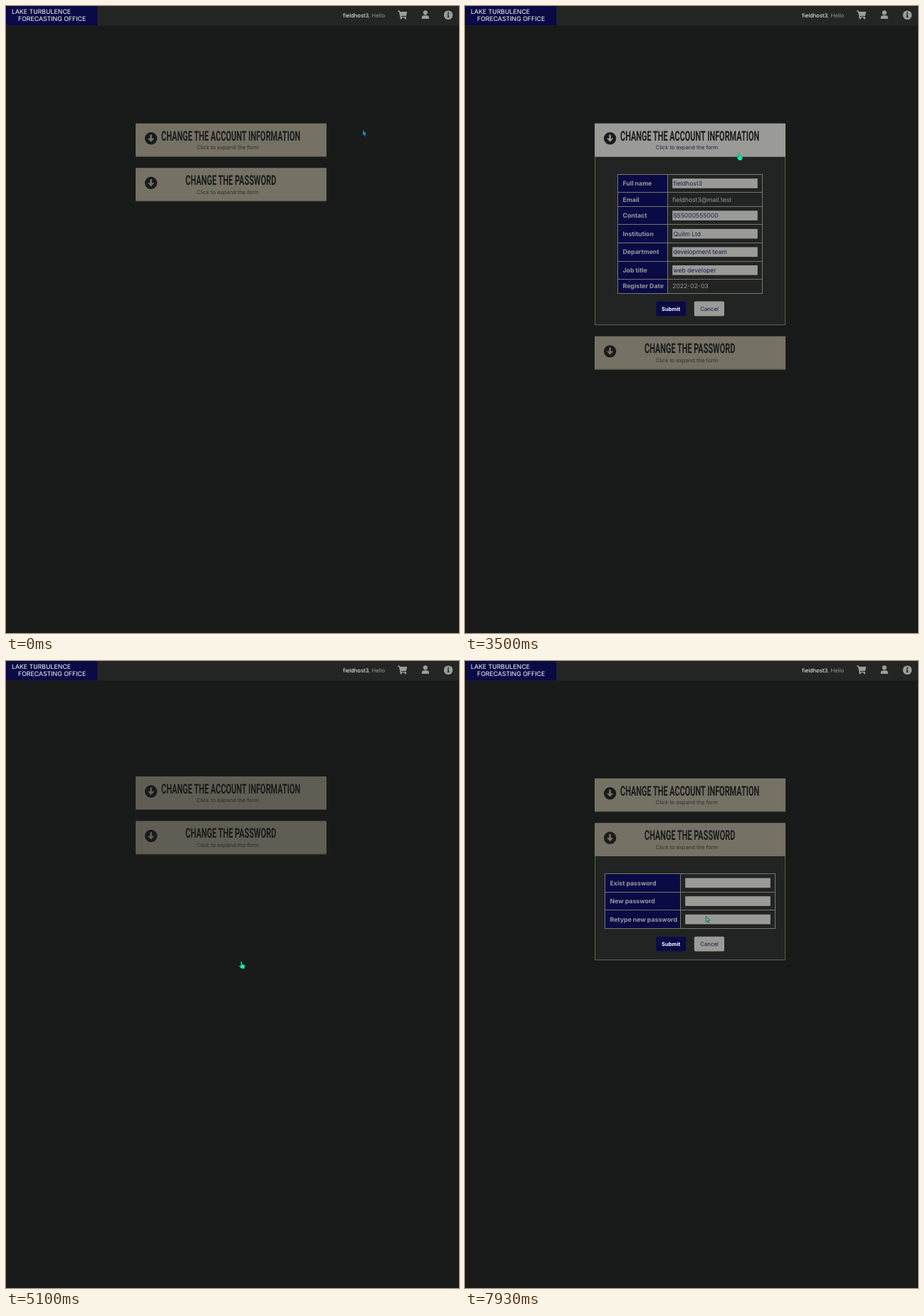
Animation, 636 px wide and 880 px high, one loop 8 s. Source, as an HTML page:

```html
<!DOCTYPE html>
<html lang="en">
<head>
<meta charset="utf-8">
<title>Account settings</title>
<style>
  html, body { margin: 0; width: 100%; height: 100%; overflow: hidden; background: #191b1a; }
  svg { display: block; width: 636px; height: 880px; font-family: Inter, Roboto, sans-serif; text-rendering: geometricPrecision; }
  .brand { font-size: 8.75px; fill: #fff; }
  .user { font-size: 7.7px; fill: #9a9a97; text-anchor: end; }
  .user tspan { fill: #fff; }
  .icon { fill: #9d9d9b; }
  .card { --face: #757165; --edge: #4d4b42; --note: #31312c; }
  .card.hover { --face: #9a9a96; --edge: #70706d; --note: #20224a; }
  .face, .cut { fill: var(--face); }
  .edge { fill: var(--edge); }
  .open .edge { display: none; }
  .dark { fill: #1a1c1b; }
  .title { font: 600 19px Roboto, sans-serif; fill: #1a1c1b; text-anchor: middle; }
  .note { font-size: 7.55px; fill: var(--note); text-anchor: middle; }
  .panel { fill: #222423; stroke: #5f5d55; shape-rendering: crispEdges; }
  .grid { fill: none; stroke: #77756b; shape-rendering: crispEdges; }
  .navy { fill: #0a0a45; }
  .label { font-size: 8.75px; font-weight: 700; fill: #9a9a9c; }
  .value { font-size: 8.6px; fill: #9a9a97; }
  .input { fill: #9a9a97; }
  .typed { fill: #1d1d50; }
  .button { font-size: 7.8px; text-anchor: middle; fill: #15154a; }
  .submit { font-size: 7.6px; font-weight: 700; fill: #fff; }
</style>
</head>
<body>
<svg viewBox="0 0 636 880">
  <rect width="636" height="880" fill="#191b1a"/>
  <rect width="636" height="27.7" fill="#242625"/>
  <rect class="navy" width="128.3" height="27.3"/>
  <text class="brand" x="8" y="10.7">LAKE TURBULENCE</text>
  <text class="brand" x="17" y="20.8">FORECASTING OFFICE</text>
  <text class="user" x="532" y="15.6"><tspan>fieldhost3</tspan>, Hello</text>
  <g class="icon">
    <path d="M550 6.5h2.8l.5 1.6h9.9l-1.3 6h-7.3l.2 1h6.6v1.2h-7.9l-1.7-8.4H550z"/>
    <circle cx="554.7" cy="17" r="1.4"/><circle cx="560.8" cy="17" r="1.4"/>
    <circle cx="588.8" cy="9.3" r="3.1"/>
    <path d="M583.7 18v-1.4q0-3.4 3.2-3.4h3.8q3.2 0 3.2 3.4V18z"/>
    <circle cx="621" cy="12.8" r="6.3"/>
    <path fill="#242625" d="M619.4 11.6h2.4v3.3h.8v1.2h-3.2v-1.2h.8v-2.1h-.8z"/>
    <circle cx="621" cy="9.7" r="1.1" fill="#242625"/>
  </g>
  <g id="page"></g>
  <circle id="click" r="7.7" fill="#d9ca35" opacity=".82"/>
  <g id="cursor">
    <path id="arrow" d="M0 0V8.2L1.8 6.6 3 9.4 4.3 8.8 3.2 6.1H5.6z" stroke="#17302c" stroke-width=".6"/>
    <path id="hand" fill="#08f0ac" stroke="#0b3a34" stroke-width=".3"
      d="M-.8 .2Q0 -1 .8 .2V3.6L3.8 4.2Q5 4.6 4.9 6L4.2 9.8H-.2L-2.9 6.4Q-2.8 5 -1.6 5.5L-.8 6.1z"/>
  </g>
</svg>
<script>
const LOOP = 8000, CARD_Y = 165;
const $ = id => document.getElementById(id);
const show = (el, on) => el.style.display = on ? '' : 'none';
const rect = (cls, x, y, w, h, r = 0) =>
  `<rect class="${cls}" x="${x}" y="${y}" width="${w}" height="${h}" rx="${r}"/>`;
const text = (cls, x, y, s) => `<text class="${cls}" x="${x}" y="${y}">${s}</text>`;

function row(x, y, split, right, [label, value, h, typed]) {
  const mid = y + h / 2, base = mid + 3.1;
  return rect('navy', x, y, split - x, h)
    + text('label', x + 7, base, label)
    + (typed ? rect('input', split + 6.7, mid - 6.8, right - split - 13.4, 13.6) : '')
    + text(typed ? 'value typed' : 'value', split + (typed ? 8 : 6.7), base, value)
    + `<path class="grid" d="M${x} ${y}H${right}"/>`;
}

function form(x, split, right, rows) {
  const top = 71.2;
  let y = top, body = '';
  for (const r of rows) {
    body += row(x, y, split, right, r);
    y += r[2];
  }
  const by = y + 11.6;
  return `<g class="form">`
    + `<rect class="panel" x="182.5" y="46.2" width="267" height="${y - 1.8}"/>` + body
    + `<path class="grid" d="M${split} ${top}V${y}"/>`
    + rect('grid', x, top, right - x, y - top)
    + rect('navy', 268.3, by, 41.8, 20.2, 2) + text('button submit', 289.2, by + 12.8, 'Submit')
    + rect('input', 321.8, by - .3, 42.2, 20.8, 2) + text('button', 343.1, by + 12.8, 'Cancel')
    + `</g>`;
}

function card(title, body) {
  return `<g class="card">${body}`
    + rect('face', 182, -.3, 268, 46.8, .8) + rect('edge', 182, 45.8, 268, 1)
    + `<circle class="dark" cx="203.6" cy="20.8" r="8.7"/>`
    + `<path class="cut" d="M202.3 15.6h2.6v5.2h3.4l-4.7 4.9-4.7-4.9h3.4z"/>`
    + `<text class="title" transform="translate(315.6 23.5) scale(.574 1)">${title}</text>`
    + text('note', 311.4, 36, 'Click to expand the form') + `</g>`;
}

const TALL = 25.55, LOW = 19.6;
$('page').innerHTML =
  card('CHANGE THE ACCOUNT INFORMATION', form(214.5, 284.5, 417.5, [
    ['Full name', 'fieldhost3', TALL, 1],
    ['Email', 'fieldhost3@mail.test', LOW, 0],
    ['Contact', '555000555000', TALL, 1],
    ['Institution', 'Quilm Ltd', TALL, 1],
    ['Department', 'development team', TALL, 1],
    ['Job title', 'web developer', TALL, 1],
    ['Register Date', '2022-02-03', LOW, 0]]))
  + card('CHANGE THE PASSWORD', form(196.5, 302.5, 435.5, [
    ['Exist password', '', TALL, 1],
    ['New password', '', TALL, 1],
    ['Retype new password', '', TALL, 1]]));

const cards = [...document.querySelectorAll('.card')];
const forms = [...document.querySelectorAll('.form')];

const smooth = p => p * p * (3 - 2 * p);
const easeOut = p => 1 - (1 - p) ** 2;

// Pointer moves: first step, last step, step count, target x, y, easing
const START = [501, 174];
const MOVES = [
  [190, 540, 6, 392, 192, smooth],
  [1270, 1480, 4, 397, 255, smooth],
  [1940, 2280, 5, 387, 197, smooth],
  [3500, 4020, 8, 330.5, 422, smooth],
  [5450, 5790, 6, 355.3, 266, easeOut],
  [7120, 7260, 3, 347, 303, smooth],
  [7860, 7930, 2, 338.3, 358, smooth]
];
const CLICKS = [[2550, 2690], [4280, 4430], [6060, 6260]];
const RELOAD = 4690;

function pointer(t) {
  let [x, y] = START;
  for (const [from, to, n, tx, ty, ease] of MOVES) {
    if (t < from) break;
    const step = Math.floor((t - from + 1) / ((to - from) / (n - 1))) + 1;
    const p = ease(Math.min(1, step / n));
    x += (tx - x) * p;
    y += (ty - y) * p;
  }
  return [x, y];
}

// CSS "ease" curve, solved by bisection
function cssEase(x) {
  let lo = 0, hi = 1, u = .5;
  for (let i = 0; i < 24; i++) {
    u = (lo + hi) / 2;
    const bx = .75 * u * (1 - u) ** 2 + .75 * u * u * (1 - u) + u ** 3;
    if (bx < x) lo = u; else hi = u;
  }
  return .3 * u * (1 - u) ** 2 + 3 * u * u * (1 - u) + u ** 3;
}

function fadeIn(t) {
  if (t < RELOAD) return 1;
  const held = t < 4820 ? RELOAD : 4820 + 70 * Math.floor((t - 4820) / 70);
  return cssEase(Math.min(1, (held - 4620) / 1000));
}

function draw(t) {
  const open = [t >= 2690 && t < RELOAD, t >= 6260];
  const tops = [CARD_Y, open[0] ? 463.8 : 227.5];
  const [x, y] = pointer(t);
  const shown = fadeIn(t);

  $('page').setAttribute('opacity', shown);
  $('page').setAttribute('transform', `translate(0 ${-12.5 * (1 - shown)})`);

  let hand = t >= 4020 && t < 5450;
  cards.forEach((el, i) => {
    const over = x > 182 && x < 450 && y > tops[i] && y < tops[i] + 47;
    hand ||= over;
    el.classList.toggle('hover', over);
    el.classList.toggle('open', open[i]);
    el.setAttribute('transform', `translate(0 ${tops[i]})`);
    show(forms[i], open[i]);
  });

  $('cursor').setAttribute('transform', `translate(${x} ${y})`);
  $('arrow').setAttribute('fill', t < 540 ? '#2a90d2' : '#48c9a2');
  show($('hand'), hand);
  show($('arrow'), !hand);

  $('click').setAttribute('cx', x);
  $('click').setAttribute('cy', y);
  show($('click'), CLICKS.some(([a, b]) => t >= a && t < b));
}

const begin = performance.now();
function tick() {
  draw((performance.now() - begin) % LOOP);
  requestAnimationFrame(tick);
}
tick();
</script>
</body>
</html>
```
